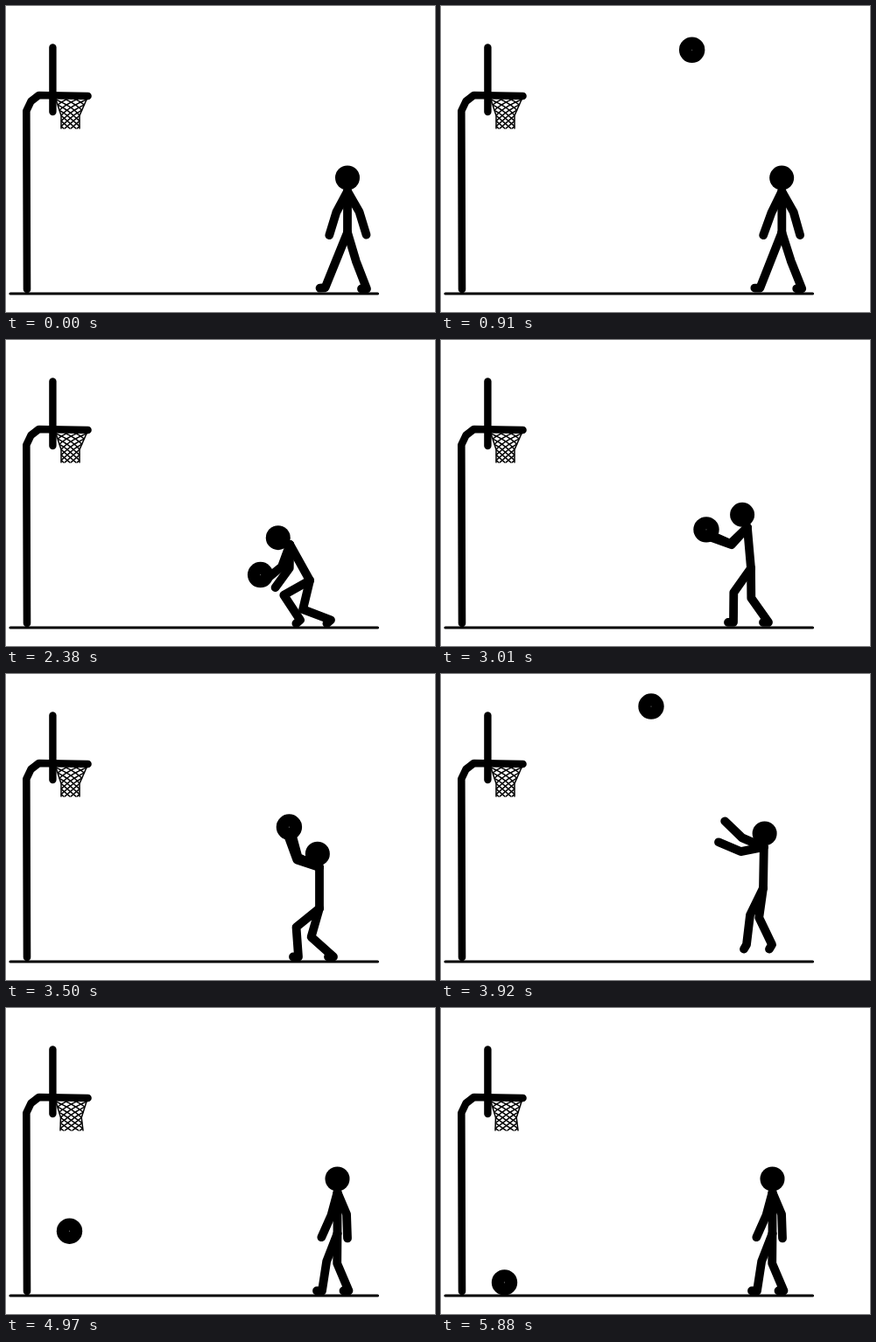
An HTML page with a canvas for the animation above (6.3 s loop, 490x350 px).

```html
<!DOCTYPE html>
<html lang="en">
<head>
<meta charset="utf-8">
<title>Free throw</title>
<style>
html, body { margin: 0; width: 100%; height: 100%; overflow: hidden; background: #fff; }
canvas { display: block; }
</style>
</head>
<body>
<canvas id="stage" width="490" height="350"></canvas>
<script>
const ctx = document.getElementById('stage').getContext('2d');
const LOOP = 6300, STEP = 70, LAST = 5880;
const GRAVITY = 0.00087, BALL_FLOOR = 314, ANKLE_FLOOR = 323.5;
const LEG = 34.1, LIMB = 9.8;
const FEED = 770, CATCH = 2240, RELEASE = 3690, NET = 4340, LANDING = 4710;

const pose = (start, end, hip, lean, tilt, feet, arms) =>
  ({ start, end, values: [...hip, lean, tilt, ...feet, ...arms] });

// Each pose is eased into between its two times and then held.
const poses = [
  pose(-1, 0, [390, 259], 0, 0, [364, 412], [-28, -17, 30, 17]), // stand
  pose(770, 1610, [381, 260], 0, -8, [364, 415], [-2, -54, 24, 0]), // await
  pose(1610, 2240, [347, 275], -29, -60, [371, 336], [-20, -51, -1, -36]), // scoop
  pose(2450, 3010, [354, 261], -5, -22, [374, 334], [-42, -110, -46, -114]), // hold
  pose(3080, 3500, [358, 268], 0, -8, [374, 334], [-115, -165, -108, -160]), // aim
  pose(3500, 3710, [366, 258], 1, 2, [377, 345], [-138, -146, -146, -152]), // throw
  pose(3710, 3920, [368, 259], 1, 3, [378, 349], [-79, -113, -113, -134]), // follow
  pose(3990, 4970, [378.5, 258], 0, 0, [391.5, 361], [-15, -24, 23, 2]) // rest
];

const ramp = (t, a, b) => Math.min(1, Math.max(0, (t - a) / (b - a)));
const arch = f => Math.sin(Math.PI * f);
const ease = f => f * f * (3 - 2 * f);

// Angle 0 points down, negative angles turn to the left.
function reach([x, y], length, deg) {
  const r = deg * Math.PI / 180;
  return [x + Math.sin(r) * length, y + Math.cos(r) * length];
}

function line(points, width) {
  ctx.lineWidth = width;
  ctx.beginPath();
  points.forEach(p => ctx.lineTo(...p));
  ctx.stroke();
}

function disc([x, y], r, color = '#000') {
  ctx.fillStyle = color;
  ctx.beginPath();
  ctx.arc(x, y, r, 0, Math.PI * 2);
  ctx.fill();
}

function drawNet(sway) {
  const at = (u, v) => {
    const taper = Math.min(1, v * 1.8);
    const left = 57 + 6 * taper - sway * v / 4;
    const right = 92 - 8 * taper + sway * v;
    return [left + (right - left) * u, 107 + 33 * v];
  };
  const strand = u => line(Array.from({ length: 31 }, (_, i) => at(u(i / 30), i / 30)), 1.5);
  strand(() => 0);
  strand(() => 1);
  for (let k = 0; k < 6; k++) {
    strand(v => Math.abs((k / 3 + 1.8 * v) % 2 - 1));
  }
}

function drawCourt(t) {
  line([[5, 329], [424.5, 329]], 3.2);
  line([[24, 324], [23.3, 120], [28.5, 109], [37.5, 102], [93.5, 103]], 8.6);
  line([[53.4, 47.5], [53.4, 121]], 8.4);
  drawNet(4 * ramp(t, 4270, 4410) + 4 * arch(ramp(t, 4270, 4620)));
}

function drawLeg(hip, x, lift) {
  let dx = x - hip[0], dy = ANKLE_FLOOR - lift - hip[1];
  const far = Math.hypot(dx, dy), d = Math.min(far, 2 * LEG);
  dx *= d / far;
  dy *= d / far;
  const bend = Math.sqrt(LEG * LEG - d * d / 4);
  const knee = [hip[0] + dx / 2 - dy / d * bend, hip[1] + dy / 2 + dx / d * bend];
  const ankle = [hip[0] + dx, hip[1] + dy];
  // The toe drops as the heel leaves the floor.
  const drop = Math.max(0, ANKLE_FLOOR - ankle[1] - 1);
  line([hip, knee, ankle, reach(ankle, 6, -90 + Math.min(60, 18 * drop))], LIMB);
}

function drawArm(shoulder, upper, lower) {
  const elbow = reach(shoulder, 27, upper);
  const hand = reach(elbow, 27.5, lower);
  line([shoulder, elbow, hand], LIMB);
  return hand;
}

function poseAt(t) {
  let values = poses[0].values, lifts = [0, 0];
  for (const next of poses.slice(1)) {
    if (t <= next.start) break;
    const f = ramp(t, next.start, next.end), from = values;
    values = from.map((v, i) => v + (next.values[i] - v) * ease(f));
    lifts = [4, 5].map(i => 0.15 * Math.abs(next.values[i] - from[i]) * arch(f));
  }
  return { values, lifts };
}

// Draws the player and returns the hand that carries the ball.
function drawPlayer(t) {
  const { values, lifts } = poseAt(t);
  const [x, y, lean, tilt, footA, footB, aUp, aLow, bUp, bLow] = values;
  const jump = 18 * arch(ramp(t, 3570, 4060));
  const heel = Math.max(0, -lean / 9);
  const wave = arch(ramp(t, 0, 770));
  const hip = [x, y - jump];
  const neck = reach(hip, 47, 180 - lean);
  line([hip, neck], LIMB);
  disc(reach(neck, 15.5, 180 - tilt), 14);
  drawLeg(hip, footA, jump + heel + lifts[0]);
  drawLeg(hip, footB, jump + heel + lifts[1]);
  drawArm(neck, bUp, bLow);
  return drawArm(neck, aUp - 85 * wave, aLow - 160 * wave ** 3);
}

// Height after repeated bounces; each hop lasts a fixed share of the one before.
function bounce(t, start, hop, share) {
  while (t > start + hop && hop > 20) {
    start += hop;
    hop *= share;
  }
  return BALL_FLOOR - Math.max(0, GRAVITY * (t - start) * (start + hop - t));
}

function ballAt(t, hand) {
  if (t < CATCH) return [286 + 4 * ramp(t, FEED, 1610), bounce(t, -20, 1256, 0.6)];
  if (t < RELEASE) return [hand[0] - 3, hand[1] - 8];
  const flight = t - 4060, fall = t - NET;
  const x = Math.max(72.5, 185 - 0.393 * flight);
  if (t < NET) return [x, 20 + GRAVITY * flight ** 2];
  if (t < LANDING) return [x, 88 + 0.29 * fall + GRAVITY * fall ** 2];
  return [x, bounce(t, LANDING, 520, 0.57)];
}

function draw(time) {
  const t = Math.min(LAST, Math.floor(time % LOOP / STEP) * STEP);
  ctx.fillStyle = '#fff';
  ctx.fillRect(0, 0, 490, 350);
  ctx.strokeStyle = '#000';
  ctx.lineCap = ctx.lineJoin = 'round';
  drawCourt(t);
  const hand = drawPlayer(t);
  if (t >= FEED) {
    const ball = ballAt(t, hand);
    disc(ball, 14.7);
    disc(ball, 0.6, '#777');
  }
}

let start;
function tick(now) {
  start ??= now;
  draw(now - start);
  requestAnimationFrame(tick);
}
draw(0);
requestAnimationFrame(tick);
</script>
</body>
</html>
```
